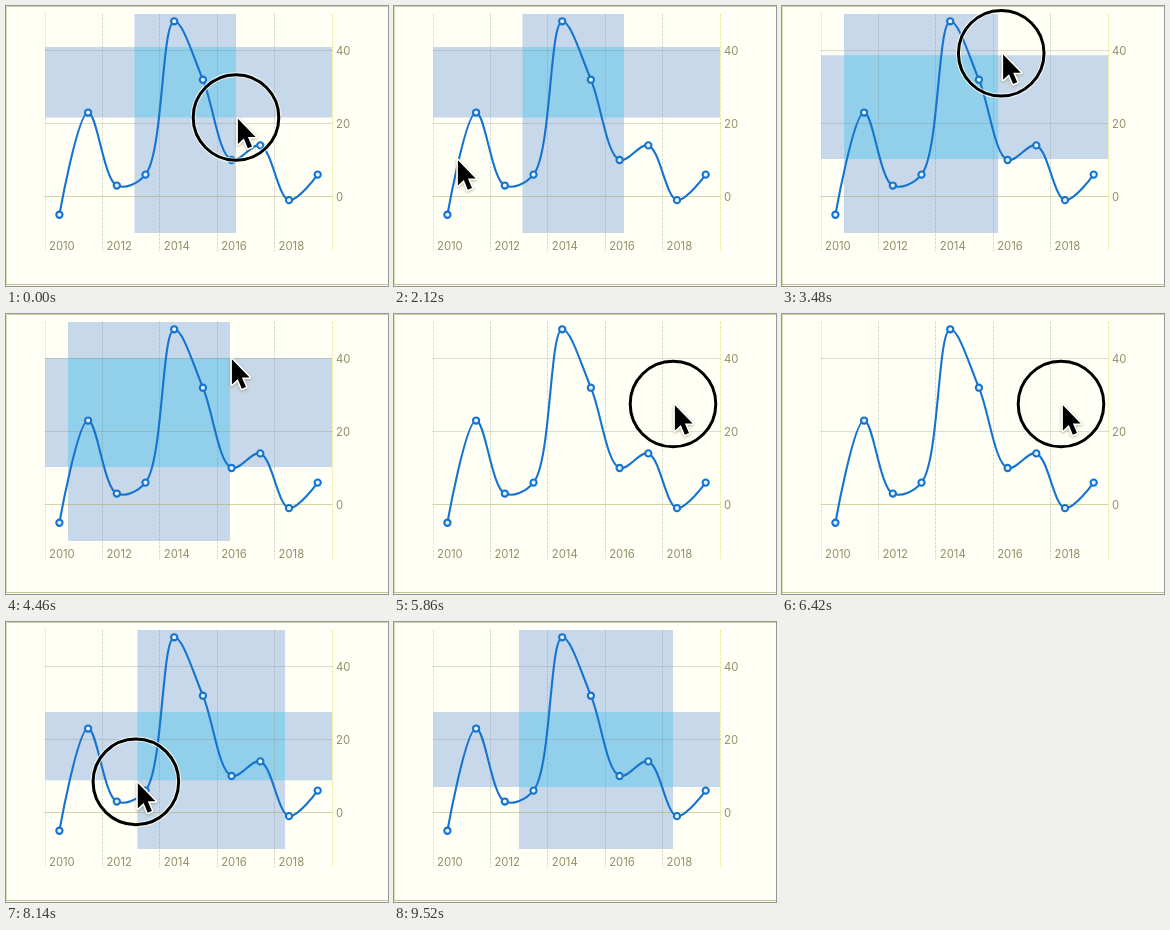
Animation, 382 px wide and 280 px high, one loop 9540 ms. Source, as an HTML page with a canvas:

```html
<!DOCTYPE html>
<html lang="en">
<head>
<meta charset="utf-8">
<title>Chart range selection</title>
<style>
html, body { margin: 0; width: 100%; height: 100%; overflow: hidden; background: #fffff5; }
canvas { display: block; width: 382px; height: 280px; }
</style>
</head>
<body>
<canvas id="stage" width="382" height="280"></canvas>
<script>
const ctx = document.getElementById('stage').getContext('2d');
const LOOP = 9540, LAG = 24;
const plot = { l: 39, r: 326, t: 8, b: 227 };
const STEP = 28.7;
const values = [-5, 23, 3, 6, 48, 32, 10, 14, -1, 6];
const yOf = v => 190.5 - v * 3.65;
const points = values.map((v, i) => [53.4 + i * STEP, yOf(v)]);

// Pointer stops: time, x, y
const path = [
  [0, 230, 111.5], [280, 230, 111.5], [940, 62, 153], [2800, 62, 153],
  [3565, 224, 44], [4960, 224, 44], [5500, 279, 90], [6500, 279, 90],
  [7650, 153, 135.5], [7720, 153, 135.5], [8300, 125, 165],
  [8960, 125, 165], [9460, 100, 292]
];
// Press and release times with the point where each drag begins
const drags = [
  { down: -1000, up: 120, x: 128.5, y: 41 },
  { down: 2500, up: 4000, x: 62, y: 153 },
  { down: 5700, up: 8700, x: 279, y: 90 }
];

const ease = u => (1 - Math.cos(Math.PI * u)) / 2;

function pointer(t) {
  if (t <= path[0][0]) return path[0].slice(1);
  for (let i = 1; i < path.length; i++) {
    const [t0, x0, y0] = path[i - 1], [t1, x1, y1] = path[i];
    if (t < t1) {
      const e = ease((t - t0) / (t1 - t0));
      return [x0 + (x1 - x0) * e, y0 + (y1 - y0) * e];
    }
  }
  return path[path.length - 1].slice(1);
}

// Centripetal Catmull-Rom control point beside b, on the way to c
function handle(a, b, c) {
  const p = Math.hypot(b[0] - a[0], b[1] - a[1]);
  const q = Math.hypot(c[0] - b[0], c[1] - b[1]);
  if (p < 1e-6) return b;
  const sp = Math.sqrt(p), sq = Math.sqrt(q);
  const k = 2 * p + 3 * sp * sq + q, n = 3 * sp * (sp + sq);
  return [0, 1].map(j => (b[j] * k - a[j] * q + c[j] * p) / n);
}

const curve = new Path2D();
curve.moveTo(...points[0]);
for (let i = 1; i < points.length; i++) {
  const a = points[i - 1], b = points[i];
  const before = points[i - 2] || a, after = points[i + 1] || b;
  curve.bezierCurveTo(...handle(before, a, b), ...handle(after, b, a), ...b);
}

const arrow = new Path2D('M0 0V25.3L5.9 19.9L9.9 29.6L14.1 27.9L10 18.3H17.7Z');

function segment(x0, y0, x1, y1, color, dash) {
  ctx.strokeStyle = color;
  ctx.lineWidth = 1;
  ctx.setLineDash(dash || []);
  ctx.beginPath();
  ctx.moveTo(x0, y0);
  ctx.lineTo(x1, y1);
  ctx.stroke();
  ctx.setLineDash([]);
}

function drawSelection(t) {
  const drag = drags.filter(d => t >= d.down).pop();
  const [x, y] = pointer(Math.min(t - LAG, drag.up));
  const l = Math.min(x, drag.x), w = Math.abs(x - drag.x);
  const top = Math.min(y, drag.y), h = Math.abs(y - drag.y);
  if (w < 0.5 && h < 0.5) return;
  ctx.fillStyle = '#c8d8eb';
  ctx.fillRect(l, plot.t, w, plot.b - plot.t);
  ctx.fillRect(plot.l, top, plot.r - plot.l, h);
  ctx.fillStyle = '#91cfea';
  ctx.fillRect(l, top, w, h);
}

function drawAxes() {
  ctx.font = '11.3px Inter, Roboto, sans-serif';
  ctx.fillStyle = '#909066';
  ctx.textBaseline = 'alphabetic';
  for (let i = 0; i <= 5; i++) {
    const x = Math.floor(plot.l + i * 57.4) + 0.5;
    const edge = i % 5 === 0;
    segment(x, plot.t, x, 245, edge ? 'rgba(225,220,90,.6)' : 'rgba(130,135,110,.3)', [2, 2]);
    if (i < 5) ctx.fillText(2010 + 2 * i, 43 + i * 57.4, 244);
  }
  for (const v of [0, 20, 40]) {
    const y = Math.floor(yOf(v)) + 0.5;
    segment(plot.l, y, plot.r, y, v ? 'rgba(125,130,115,.27)' : 'rgba(165,165,80,.48)');
    ctx.fillText(v, 330, y + 4);
  }
}

function drawLine() {
  ctx.strokeStyle = '#1474cf';
  ctx.lineWidth = 2.1;
  ctx.lineJoin = ctx.lineCap = 'round';
  ctx.stroke(curve);
  ctx.fillStyle = '#e6f3fc';
  for (const [x, y] of points) {
    ctx.beginPath();
    ctx.arc(x, y, 3.1, 0, 7);
    ctx.fill();
    ctx.stroke();
  }
}

function drawPointer(t) {
  const [x, y] = pointer(t);
  if (drags.some(d => t >= d.down && t < d.up)) {
    ctx.beginPath();
    ctx.arc(x, y, 42.8, 0, 7);
    ctx.strokeStyle = 'rgba(255,255,245,.75)';
    ctx.lineWidth = 5;
    ctx.stroke();
    ctx.strokeStyle = '#000';
    ctx.lineWidth = 3;
    ctx.stroke();
  }
  ctx.save();
  ctx.translate(x + 1.9, y + 1.2);
  ctx.lineJoin = 'round';
  ctx.shadowColor = 'rgba(80,80,0,.4)';
  ctx.shadowBlur = 3;
  ctx.shadowOffsetY = 1;
  ctx.strokeStyle = '#fff';
  ctx.lineWidth = 3.2;
  ctx.stroke(arrow);
  ctx.shadowColor = 'transparent';
  ctx.fillStyle = '#000';
  ctx.fill(arrow);
  ctx.restore();
}

function draw(t) {
  ctx.fillStyle = '#fffff5';
  ctx.fillRect(0, 0, 382, 280);
  segment(0, 0.5, 382, 0.5, '#d2d2a8');
  segment(0.5, 0, 0.5, 279, '#dedeb4');
  segment(0, 278.5, 382, 278.5, '#c4c498');
  drawSelection(t);
  drawAxes();
  drawLine();
  if (t < 9460) drawPointer(t);
}

const start = performance.now();
function tick() {
  draw((performance.now() - start) % LOOP);
  requestAnimationFrame(tick);
}
tick();
</script>
</body>
</html>
```
